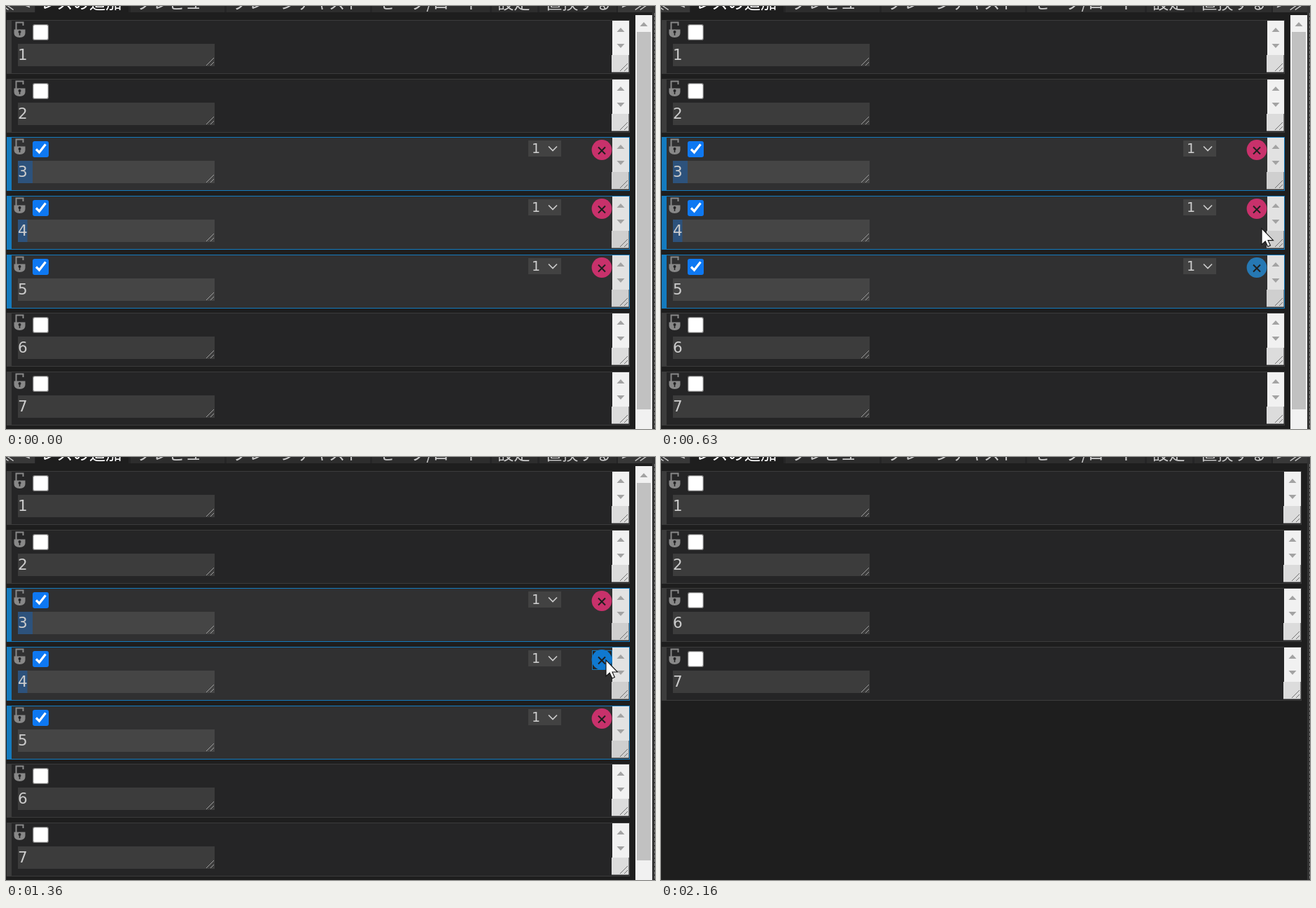
Recreate the animation shown at these times as an HTML page. Size 927 by 604 pixels, loop 2.23 s.

```html
<!DOCTYPE html>
<html lang="ja">
<head>
<meta charset="utf-8">
<style>
html, body { margin: 0; width: 100%; height: 100%; overflow: hidden; background: #1e1e1e; }
svg { display: block; }
.tab { font: 23.3px "Noto Sans CJK JP", "Noto Sans CJK", sans-serif; }
.num { font-family: "DejaVu Sans", sans-serif; fill: #ccc; }
</style>
</head>
<body>
<svg id="stage" width="927" height="604" viewBox="0 0 927 604"></svg>
<script>
const LOOP = 2230, ENTER = 180, PRESS = 1290, RELEASE = 1360, REMOVED = 1450, LEAVE = 2160;
const TICK = 37.7, HOVER_LAG = 80, PITCH = 83.67;
const BLUE = '#147bbf';

// Pointer keys: time, x, y
const path = [
  [180, 866, 598], [250, 862, 532], [400, 860, 440], [560, 858, 367], [630, 858, 318],
  [670, 858, 312], [710, 858, 311], [1000, 855, 294], [1090, 857, 290],
  [1870, 857, 290], [1960, 859, 345], [2050, 862, 460], [2150, 866, 610]
];

const rect = (x, y, w, h, fill, extra = '') =>
  `<rect x="${x}" y="${y}" width="${w}" height="${h}" fill="${fill}" ${extra}/>`;
const line = (d, color, width, extra = '') =>
  `<path d="${d}" fill="none" stroke="${color}" stroke-width="${width}" ${extra}/>`;
const label = (text, x, y, size) =>
  `<text class="num" x="${x}" y="${y}" font-size="${size}">${text}</text>`;
const triangle = (x, y, dir) =>
  `<path d="M${x - 5.5} ${y + 3 * dir}h11l-5.5 ${-6 * dir}z" fill="#a3a3a3"/>`;
const grip = (x, y, color) =>
  line(`M${x - 11} ${y}l11 -11M${x - 5} ${y}l5 -5`, color, .9);

function pointerAt(t) {
  if (t < ENTER || t >= LEAVE) return null;
  const snapped = Math.max(ENTER, 180 + TICK * Math.floor((t - 174) / TICK));
  const i = Math.max(1, path.findIndex(p => p[0] >= snapped));
  const [a, b] = snapped > path.at(-1)[0] ? path.slice(-2) : [path[i - 1], path[i]];
  const k = Math.min(1, (snapped - a[0]) / (b[0] - a[0]));
  return { x: a[1] + (b[1] - a[1]) * k, y: a[2] + (b[2] - a[2]) * k };
}

const rowTop = i => Math.floor(21.4 + PITCH * i);

function hitTest(p, count, shift) {
  const hit = { row: -1, button: -1 };
  if (!p) return hit;
  for (let i = 0; i < count; i++) {
    const top = rowTop(i);
    if (p.y >= top && p.y <= top + 76) hit.row = i;
    if (Math.hypot(p.x - 851 - shift, p.y - top - 17.5) < 15) hit.button = i;
  }
  return hit;
}

function lock() {
  return line('M14.5 13V2.5h10V7', '#888', 2)
    + '<path d="M11.5 12.5h16v5q0 6.5 -8 6.5t-8 -6.5z" fill="#888"/>'
    + '<circle cx="19.5" cy="16" r="2" fill="#252526"/>'
    + rect(18.7, 16, 1.6, 5, '#252526');
}

function checkbox(checked, lit) {
  return checked
    ? rect(38, 5, 23, 23, '#0e78f2', 'rx="3"')
      + line('M43 16.5l4.5 4.5 9 -11.5', '#fff', 3.2)
    : rect(38.6, 5.6, 21.8, 21.8, lit ? '#f0f0f0' : '#fff', 'rx="2.5" stroke="#767676" stroke-width="1.3"');
}

function controls(shift, color, focused) {
  return `<g transform="translate(${shift})">`
    + rect(746, 4, 47, 23, '#424242') + label('1', 751, 22, 19)
    + line('M775 12.5l6 6 6 -6', '#ccc', 1.7)
    + (focused ? rect(837.5, 4.5, 28, 27, '#252526', `stroke="${BLUE}"`) : '')
    + `<circle cx="851" cy="17.5" r="14.4" fill="${color}"/>`
    + line('M846 13.5l10 10m0 -10l-10 10', '#1e1e1e', 2) + '</g>';
}

function row(i, name, s) {
  const selected = s.full && i >= 2 && i <= 4;
  const lit = selected || s.hover.row === i;
  const edge = selected ? BLUE : '#3c3c3c';
  const right = 891 + s.shift;
  const pressed = s.pressed && i === 3;
  const button = pressed ? '#1079d0' : s.hover.button === i ? '#2678b3' : '#c8316b';
  const marked = selected && i < 4 ? (i === 2 ? 21 : 13.5) : 0;
  return `<g transform="translate(0 ${rowTop(i)})">`
    + rect(1.5, -.5, right - 2, 76, lit ? '#303031' : '#252526', `stroke="${edge}"`)
    + rect(1, -1, 7, 77, edge) + lock() + checkbox(selected, lit)
    + rect(17, 33, 281, 32, lit ? '#454545' : '#3c3c3c')
    + (marked ? rect(17, 33, marked, 32, '#2d527c') : '')
    + label(name, 17, 56, 21.5) + grip(297, 64, '#aaa')
    + (lit ? controls(s.shift, button, pressed) : '')
    + rect(right - 25, 0, 24, 49, lit ? '#e2e2e2' : '#f1f1f1')
    + rect(right - 26, 49, 24.5, 24.5, lit ? '#cfcfcf' : '#dcdcdc')
    + triangle(right - 13, 13, 1) + triangle(right - 13, 36, -1)
    + grip(right - 3, 72, '#666') + '</g>';
}

function tabs() {
  const cells = [
    [0, 41, '≪', -11], [0, 41, '<', 22], [42, 133, 'レスの追加', 49], [178, 134, 'プレビュー', 186],
    [315, 205, 'プレーンテキスト', 323], [523, 168, 'セーブ/ロード', 532],
    [694, 65, '設定', 702], [762, 110, '置換する', 771], [874, 49, '>', 879], [874, 49, '≫', 897]
  ];
  const color = x => x === 42 ? '#1e1e1e' : x === 0 || x === 874 ? '#383838' : '#2d2d2d';
  const baseline = text => text.length === 1 ? 6 : 3.5;
  return rect(0, 0, 923, 9, '#252526')
    + cells.map(([x, w]) => rect(x, 0, w, 9, color(x))).join('')
    + cells.map(([x, , text, tx]) =>
      `<text class="tab" x="${tx}" y="${baseline(text)}" fill="${x === 42 ? '#fff' : '#ccc'}">${text}</text>`).join('');
}

const frameEdge = rect(923, 0, 4, 604, '#333') + line('M926.5 10V604', '#777', 1, 'stroke-dasharray="4 2"');
const scrollbar = rect(899, 13, 24, 591, '#f1f1f1') + rect(901, 37, 20, 539, '#c1c1c1') + triangle(911, 26, 1);
const chrome = tabs() + frameEdge;

function cursor(p, hand) {
  const d = hand
    ? 'M-3 3Q-3 0 0 0T3 3V11Q5 9 7 11.5Q9.5 10 10.5 13Q13 12 13 15V20Q13 25 10.5 27V29.5H-1V27Q-5 23 -7 19L-10 15.5Q-9 12 -6 14.5L-3 17Z'
    : 'M0 0V23L5.2 18.2L8.8 26L12.4 24.4L9 17H16.5Z';
  return `<g transform="translate(${p.x.toFixed(1)} ${p.y.toFixed(1)})">`
    + `<path d="${d}" fill="#fff" stroke="#111" stroke-width="1.1"/>`
    + (hand ? line('M3 11v5M7 12v4M10.5 13.5v3', '#111', 1) : '') + '</g>';
}

function scene(t) {
  const full = t < REMOVED, shift = full ? 0 : 24;
  const names = full ? [1, 2, 3, 4, 5, 6, 7] : [1, 2, 6, 7];
  const p = pointerAt(t);
  const state = {
    full, shift, pressed: full && t >= PRESS,
    hover: hitTest(pointerAt(t - HOVER_LAG), names.length, shift)
  };
  const hand = t < RELEASE && hitTest(p, names.length, shift).button >= 0;
  return chrome + (full ? scrollbar : '') + names.map((n, i) => row(i, n, state)).join('')
    + (p ? cursor(p, hand) : '');
}

const stage = document.getElementById('stage');
const start = performance.now();
let shown = '';
function tick() {
  const markup = scene((performance.now() - start) % LOOP);
  if (markup !== shown) stage.innerHTML = shown = markup;
  requestAnimationFrame(tick);
}
tick();
</script>
</body>
</html>
```
